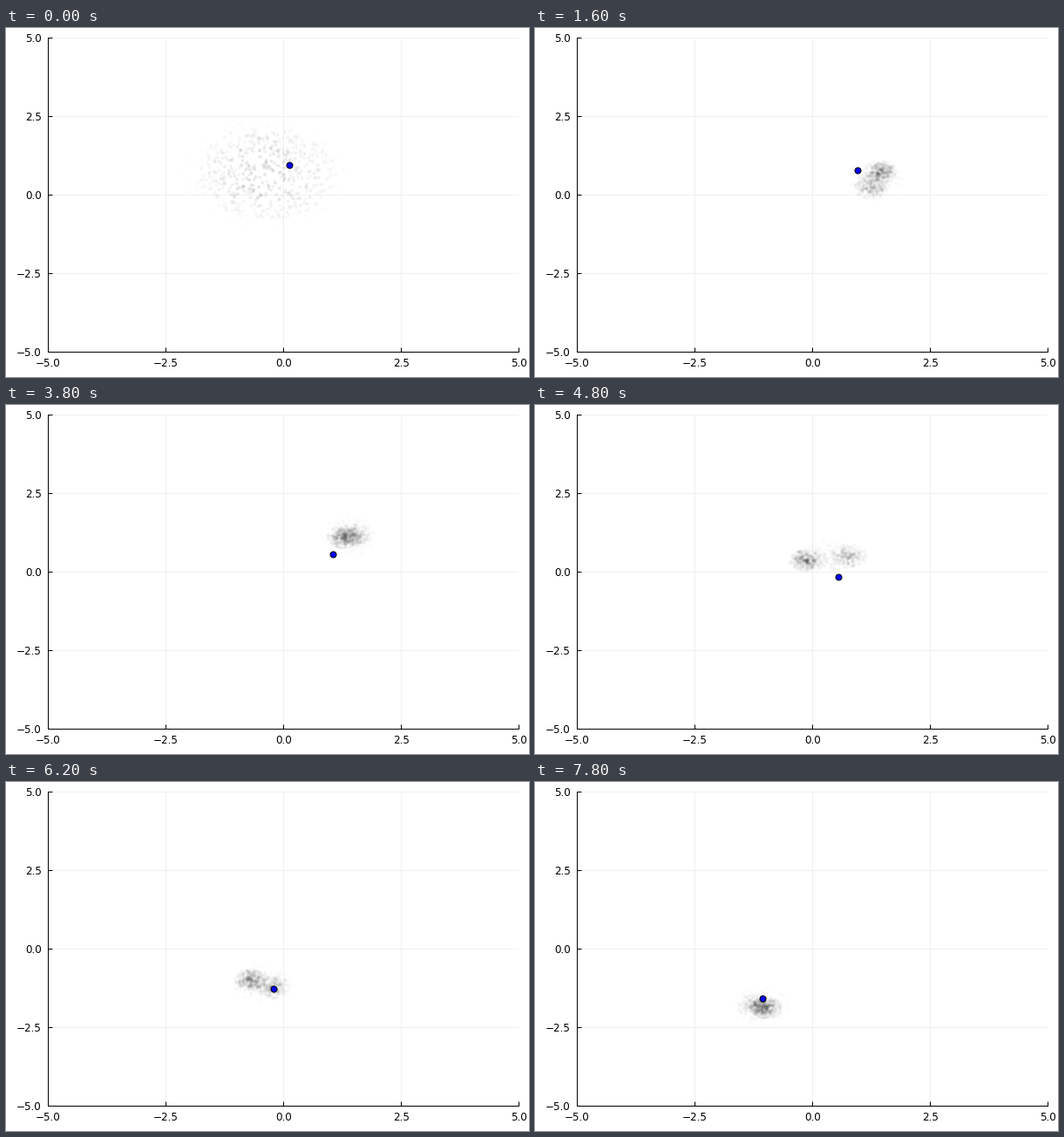
Recreate the animation shown at these times as a matplotlib script. Size 600 by 400 pixels, loop 8 s.

```python
import numpy as np
import matplotlib.pyplot as plt
from matplotlib.animation import FuncAnimation

W, H, DPI = 600, 400, 100
PT = 72 / DPI                     # points per pixel
LEFT, TOP, AW, AH = 48.2, 11.2, 540, 360
FRAMES, STEP = 40, 200
COUNT = 640

# Key points of the tracked dot and of the two clumps, in pixels
TIMES = np.array([0, 8, 14, 19, 24, 31, 39])
DOT = np.array([(325, 156.5), (370, 163), (387, 168), (375, 171),
                (348, 196.5), (307, 237), (261, 248)])
CLUMP_A = np.array([(298, 167), (397, 165), (416, 165), (387, 152),
                    (311, 178), (281, 227), (265, 259)])
CLUMP_B = np.array([(298, 167), (386, 183), (400, 170), (400, 149),
                    (360, 173), (306, 235), (254, 256)])

# Cloud layers: share of particles, mix from A to B, relative size, opacity
LAYERS = [(0.4, 0, 1.0, 1.0), (0.35, 1, 1.1, 0.7), (0.25, 0.5, 1.8, 0.45)]


def path(t, points):
    """Cubic Hermite curve through the key points."""
    slopes = np.gradient(points, TIMES, axis=0)
    i = min(np.searchsorted(TIMES, t, side="right") - 1, len(TIMES) - 2)
    h = TIMES[i + 1] - TIMES[i]
    u = (t - TIMES[i]) / h
    return ((2 * u**3 - 3 * u**2 + 1) * points[i]
            + (u**3 - 2 * u**2 + u) * h * slopes[i]
            + (3 * u**2 - 2 * u**3) * points[i + 1]
            + (u**3 - u**2) * h * slopes[i + 1])


def to_data(px):
    return np.column_stack([(px[:, 0] - LEFT) / AW * 10 - 5,
                            5 - (px[:, 1] - TOP) / AH * 10])


def cloud(frame):
    """Wide at first, then quickly gathered into two clumps and a haze."""
    rng = np.random.default_rng(100 + frame)
    a, b = path(frame, CLUMP_A), path(frame, CLUMP_B)
    start = np.exp(-frame / 0.8)
    points, alphas = [], []
    for share, mix, size, opacity in LAYERS:
        n = int(COUNT * share)
        r = 2.1 * rng.random(n)**(0.65 - 0.15 * start)
        angle = rng.uniform(0, 2 * np.pi, n)
        spread = size * np.array([9, 6]) + start * np.array([29, 19])
        unit = np.column_stack([np.cos(angle), np.sin(angle)])
        points.append(a + (b - a) * mix + r[:, None] * unit * spread)
        alphas.append((0.07 + 0.03 * start) * opacity * np.exp(-0.35 * r**2))
    return to_data(np.vstack(points)), np.concatenate(alphas)


plt.rcParams["font.family"] = "DejaVu Sans"
fig = plt.figure(figsize=(W / DPI, H / DPI), dpi=DPI, facecolor="white")
ax = fig.add_axes([LEFT / W, 1 - (TOP + AH) / H, AW / W, AH / H])
ax.set(xlim=(-5, 5), ylim=(-5, 5))
ticks = np.arange(-5, 5.1, 2.5)
labels = [f"{v:.1f}".replace("-", "\u2212") for v in ticks]
ax.set_xticks(ticks, labels)
ax.set_yticks(ticks, labels)
ax.tick_params(direction="in", length=5 * PT, width=PT, labelsize=12 * PT)
ax.tick_params(axis="x", pad=7 * PT)
ax.tick_params(axis="y", pad=7.5 * PT)
ax.grid(color="#f0f0f0", linewidth=PT)
ax.set_axisbelow(True)
for side in ("top", "right"):
    ax.spines[side].set_visible(False)
for side in ("left", "bottom"):
    ax.spines[side].set_linewidth(PT)

particles = ax.scatter([], [], s=(3.8 * PT)**2, linewidths=0, zorder=3)
dot, = ax.plot([], [], "o", ms=7 * PT, mfc="blue", mec="black",
               mew=PT, zorder=4)


def draw(frame):
    points, alphas = cloud(frame)
    colors = np.zeros((len(alphas), 4))
    colors[:, 3] = alphas
    particles.set_offsets(points)
    particles.set_facecolors(colors)
    x, y = to_data(path(frame, DOT)[None])[0]
    dot.set_data([x], [y])
    return particles, dot


anim = FuncAnimation(fig, draw, frames=FRAMES, interval=STEP,
                     init_func=lambda: draw(0), repeat=True, repeat_delay=0)
plt.show()
```
